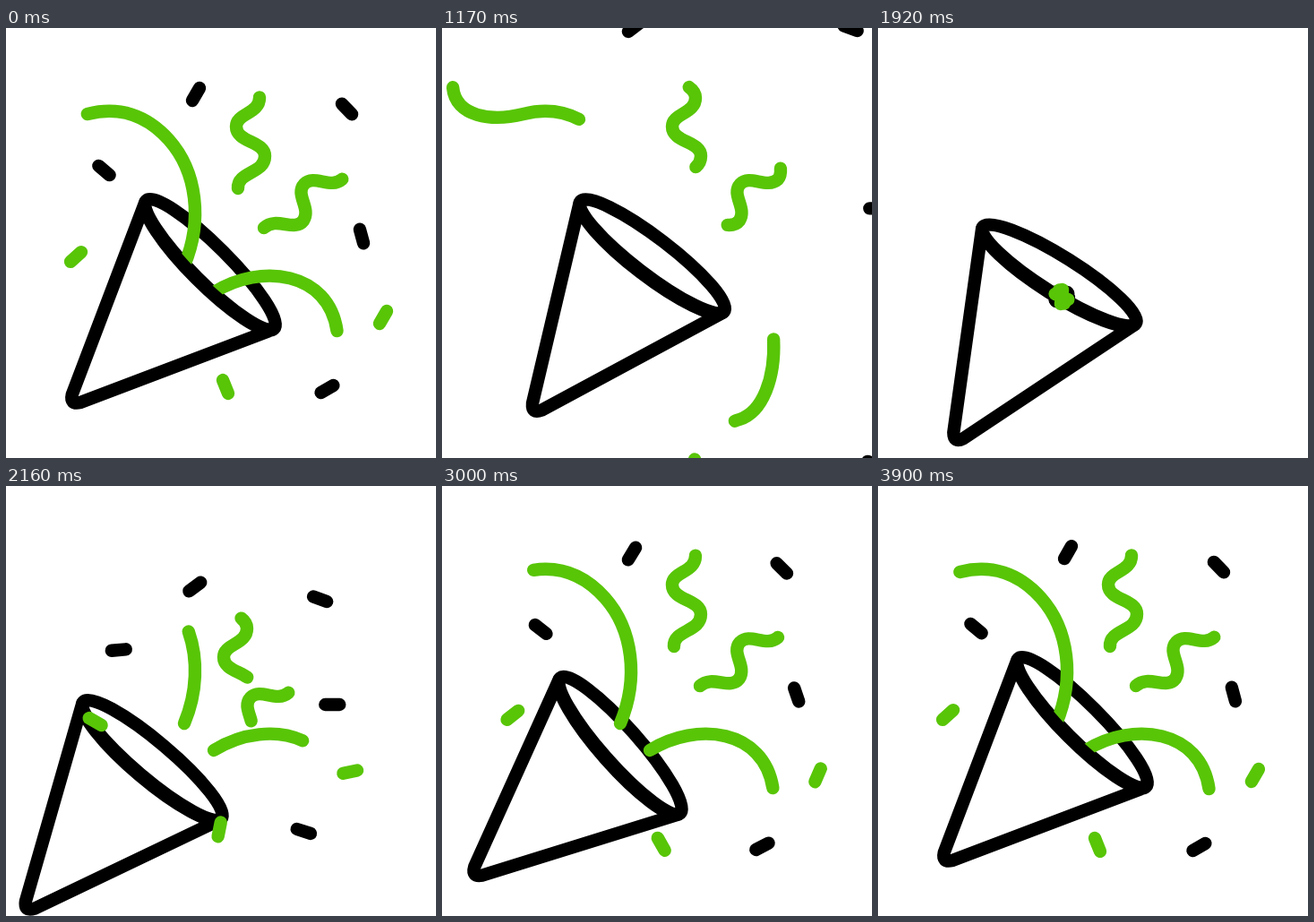
An HTML page for the animation above (3.93 s loop, 480 by 480 pixels).

```html
<!DOCTYPE html>
<html lang="en">
<head>
<meta charset="utf-8">
<title>Party popper</title>
<style>
  html, body { margin: 0; width: 100%; height: 100%; overflow: hidden; background: #fff; }
  svg { display: block; width: 100%; height: 100%; }
  .line { fill: none; stroke: #000; stroke-width: 14.4; stroke-linecap: round; stroke-linejoin: round; }
  .green { stroke: #58c507; }
</style>
</head>
<body>
<svg id="stage" viewBox="0 0 480 480">
  <g class="cone"><ellipse class="line" rx="101" ry="20.5" transform="translate(228 264) rotate(45)"/></g>
  <g id="streamers"></g>
  <g class="cone">
    <path class="line" style="fill:#fff" d="M155.5 194L73.8 409Q71 421 83 418L298 336.5A101 22 45 0 1 155.5 194Z"/>
  </g>
  <g id="confetti"></g>
</svg>
<script>
const LOOP = 3930, STEP = 30;
const FLY_START = 600, FLY_END = 1710, KICK = 1740, BURST = 1920;
const ORIGIN = { x: 205, y: 300 };

const progress = (t, from, to) => Math.max(0, Math.min(1, (t - from) / (to - from)));
const ease = (t, from, to) => (1 - Math.cos(Math.PI * progress(t, from, to))) / 2;
const burstAge = t => Math.max(0, t - BURST) / 240;

function add(parent, attrs) {
  const path = document.createElementNS("http://www.w3.org/2000/svg", "path");
  for (const key in attrs) path.setAttribute(key, attrs[key]);
  return parent ? parent.appendChild(path) : path;
}

function show(node, visible) {
  node.setAttribute("visibility", visible ? "visible" : "hidden");
}

// Resting pieces; speed scales the way out from the origin.
const piece = (x, y, angle, spin, speed, color = "") => ({ x, y, angle, spin, speed, color });
const confetti = [
  piece(109.5, 159, 40, -45, 3.2),
  piece(212, 74, -60, 23, 0.9),
  piece(380.5, 90.5, 46, -26, 1.17),
  piece(397, 232.5, 75, -75, 1.25),
  piece(358.5, 403, -30, 48, 2.2),
  piece(78, 255.5, -42, 72, 2.2, "green"),
  piece(245, 400.5, 68, -147, 2.4, "green"),
  piece(421, 323, -60, -132, 1.1, "green")
];

// Streamers: resting stroke, the track it leaves along, and how it comes back.
const streamers = [
  { rest: "M199 265C220 215 213 160 182 125C157 97 126 87 91 96",
    track: "C55 105 14 99 12 65C8 25 60 8 80 27C95 46 77 66 66 70Q58 73 48 73",
    power: 1.53, growth: 0.545 },
  { rest: "M232 295C285 262 360 272 369.5 338",
    track: "C374 385 360 428 332 437C290 450 262 480 255 530L255 610",
    power: 1.5, growth: 0.916 },
  { rest: "M259 179C258 160 289 163 289 143C289 126 257 128 257 110C257 95 283 96 283 78",
    track: "C283 60 250 62 253 46C255 35 265 32 274 26L284 18",
    power: 2.8, shift: [-14, 81], head: 13 },
  { rest: "M288 223C302 210 322 228 332 215C341 201 322 186 333 174C344 163 362 180 375 169",
    track: "C385 157 366 132 378 123C388 118 396 126 416 124",
    power: 2.9, shift: [-60, 62], head: 0 }
];

for (const s of streamers) {
  s.restLength = add(null, { d: s.rest }).getTotalLength();
  s.node = add(document.getElementById("streamers"), { class: "line green", d: s.rest + s.track });
  s.length = s.node.getTotalLength();
}
for (const c of confetti) {
  c.node = add(document.getElementById("confetti"), { class: `line ${c.color}`, d: "M-8 0H8" });
}
const cones = document.querySelectorAll(".cone");

// Winds up, kicks back, then swings home with a slight overshoot in tilt.
function drawCone(t) {
  const wind = ease(t, FLY_START, KICK);
  const kick = ease(t, KICK, 2100);
  const x = 229 + 13.3 * wind - 78.3 * kick + 65 * ease(t, 2080, 3800);
  const y = 263 - 18.5 * wind + 60.5 * kick - 42 * ease(t, 2480, 3700);
  const tilt = -15.1 * wind + 20.6 * ease(t, KICK, 2580) - 5.5 * ease(t, 2580, 3600);
  const pose = `translate(${x} ${y}) rotate(${tilt}) translate(-229 -263)`;
  cones.forEach(cone => cone.setAttribute("transform", pose));
}

function drawStreamer(s, t) {
  let from = 0, to = s.restLength, x = 0, y = 0;
  if (t < FLY_END) {
    const fly = progress(t, FLY_START, FLY_END) ** s.power;
    from = s.length * fly;
    to += (s.length - s.restLength) * fly;
  } else if (s.growth) {
    to *= 1 - Math.exp(-s.growth * burstAge(t) ** 1.15);
  } else {
    const lag = Math.exp((2160 - t) / 150);
    from = 62 * lag;
    to += s.head * Math.min(lag, 1);
    [x, y] = s.shift.map(v => v * lag);
  }
  const length = to - from;
  show(s.node, length > 0.5);
  s.node.setAttribute("stroke-dasharray", `${Math.max(0.1, length)} 9999`);
  s.node.setAttribute("stroke-dashoffset", -from);
  s.node.setAttribute("transform", `translate(${x} ${y})`);
}

function drawConfetti(c, t) {
  const flying = t < FLY_END;
  const fly = progress(t, FLY_START, FLY_END) ** 1.5;
  const reach = flying ? c.speed * fly : -Math.exp(-1.77 * burstAge(t) ** 0.69);
  const turn = flying ? 2.7 * fly : 1.53 * (1 - progress(t, BURST, 3300)) ** 2.23;
  const x = c.x + (c.x - ORIGIN.x) * reach;
  const y = c.y + (c.y - ORIGIN.y) * reach;
  show(c.node, flying || t >= BURST);
  c.node.setAttribute("transform", `translate(${x} ${y}) rotate(${c.angle + c.spin * turn})`);
}

const start = performance.now();
function tick() {
  const elapsed = (performance.now() - start) % LOOP;
  const t = Math.floor(elapsed / STEP) * STEP;
  drawCone(t);
  streamers.forEach(s => drawStreamer(s, t));
  confetti.forEach(c => drawConfetti(c, t));
  requestAnimationFrame(tick);
}
tick();
</script>
</body>
</html>
```
